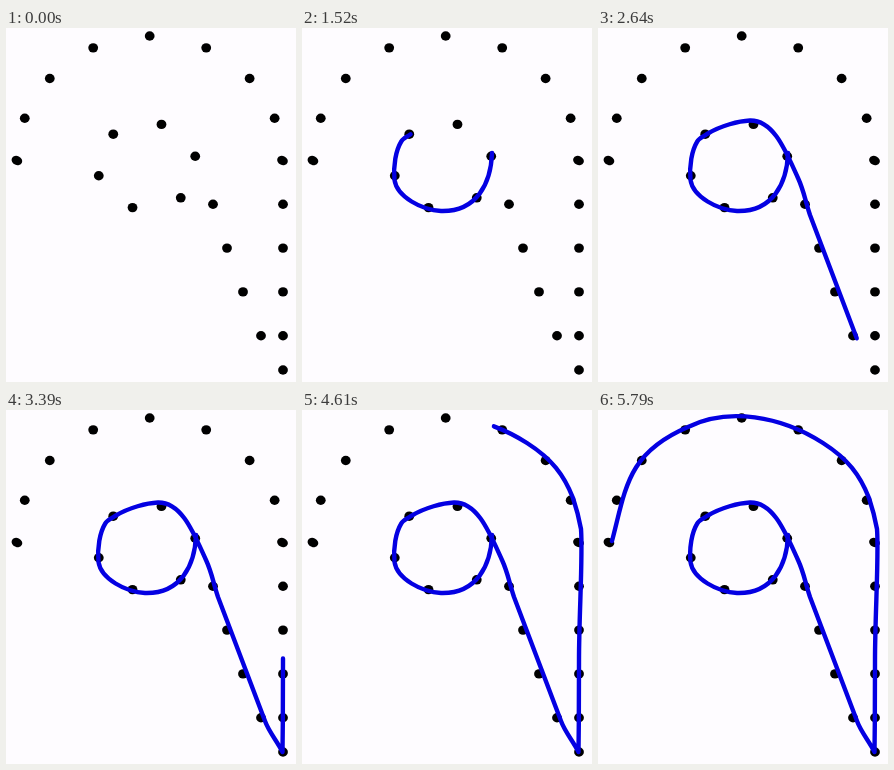
An HTML page that plays this animation: 290 by 354 pixels, repeating every 5850 ms.

```html
<!DOCTYPE html>
<html lang="en">
<head>
<meta charset="utf-8">
<title>Connect the dots</title>
<style>
  html, body { margin: 0; width: 100%; height: 100%; overflow: hidden; background: #fefcff; }
  svg { display: block; width: 100vw; height: 100vh; }
  #line { fill: none; stroke: #0400e2; stroke-width: 4.4; stroke-linecap: round; stroke-linejoin: round; }
</style>
</head>
<body>
<svg viewBox="0 0 290 354">
  <g id="dots"></g>
  <path id="line"/>
</svg>
<script>
const LOOP = 5850, START = 240, STEP = 5550 / 183;
const NS = 'http://www.w3.org/2000/svg';
const rad = degrees => degrees * Math.PI / 180;

function addDot(x, y, rx = 4.9, ry = 4.7, tilt = 0) {
  const dot = document.createElementNS(NS, 'ellipse');
  const attrs = { cx: x, cy: y, rx, ry, transform: `rotate(${tilt} ${x} ${y})` };
  for (const name in attrs) dot.setAttribute(name, attrs[name]);
  document.getElementById('dots').append(dot);
}

// Outer arch, with its two feet slightly slanted
for (let i = 0; i <= 8; i++) {
  const a = rad(22.5 * i - 3.8 * Math.sin(rad(45 * i)));
  const foot = i % 8 ? [] : [5.5, 4.5, 25];
  addDot(143.7 + 132.8 * Math.cos(a), 132.5 - 124.5 * Math.sin(a), ...foot);
}
// Inner ring
for (let i = 0; i < 6; i++) {
  const a = rad(60 * i - 13);
  addDot(141 + 49.5 * Math.cos(a), 138 + 43.5 * Math.sin(a));
}
// Right column and the slope leading to its foot
for (let i = 0; i < 4; i++) {
  const y = 176.3 + 43.8 * i;
  addDot(277, y);
  addDot(207 + 13 * i + i * i, y);
}
addDot(277, 342);

// The pen's route: when each stretch ends, and its curve
const route = [
  [200, 'M190 125'],
  [820, 'C189 155 175 184 139 183'],
  [1420, 'C120 182 95 169 92.5 152 C91 138 94 122 99 114'],
  [1520, 'C101 110 105 109 109 106'],
  [2030, 'C123 97.5 141 93 152 92.5 C176 92 188 124 200 150'],
  [2640, 'C206 163 207 172 212 187 L259 311'],
  [2890, 'C263 322 271 331 276.5 342'],
  [3240, 'L276.8 314'],
  [3390, 'L277 250'],
  [3850, 'C277 205 281 145 279 119'],
  [4150, 'C277 108 274 97 271 88'],
  [4450, 'C262 65 250 49 225 33'],
  [5060, 'C183 6 130 -3 90 17'],
  [5660, 'C29 43 28 78 14 131']
];

const line = document.getElementById('line');
let d = '';
const keys = route.map(([time, curve]) => {
  line.setAttribute('d', d += curve);
  return [time, line.getTotalLength()];
});
const total = line.getTotalLength();

function lengthAt(time) {
  const i = keys.findIndex(k => k[0] > time);
  if (i < 0) return total;
  const [t0, l0] = keys[i - 1], [t1, l1] = keys[i];
  return l0 + (l1 - l0) * (time - t0) / (t1 - t0);
}

function draw(time) {
  line.style.visibility = time < START ? 'hidden' : 'visible';
  if (time < START) return;
  // The pen moves in steps; the offset allows for their rounded start times
  const held = START + Math.floor((time - START) / STEP + 0.25) * STEP;
  line.style.strokeDasharray = `${lengthAt(held)} ${total + 50}`;
}

const origin = performance.now();
function tick() {
  draw((performance.now() - origin) % LOOP);
  requestAnimationFrame(tick);
}
tick();
</script>
</body>
</html>
```
